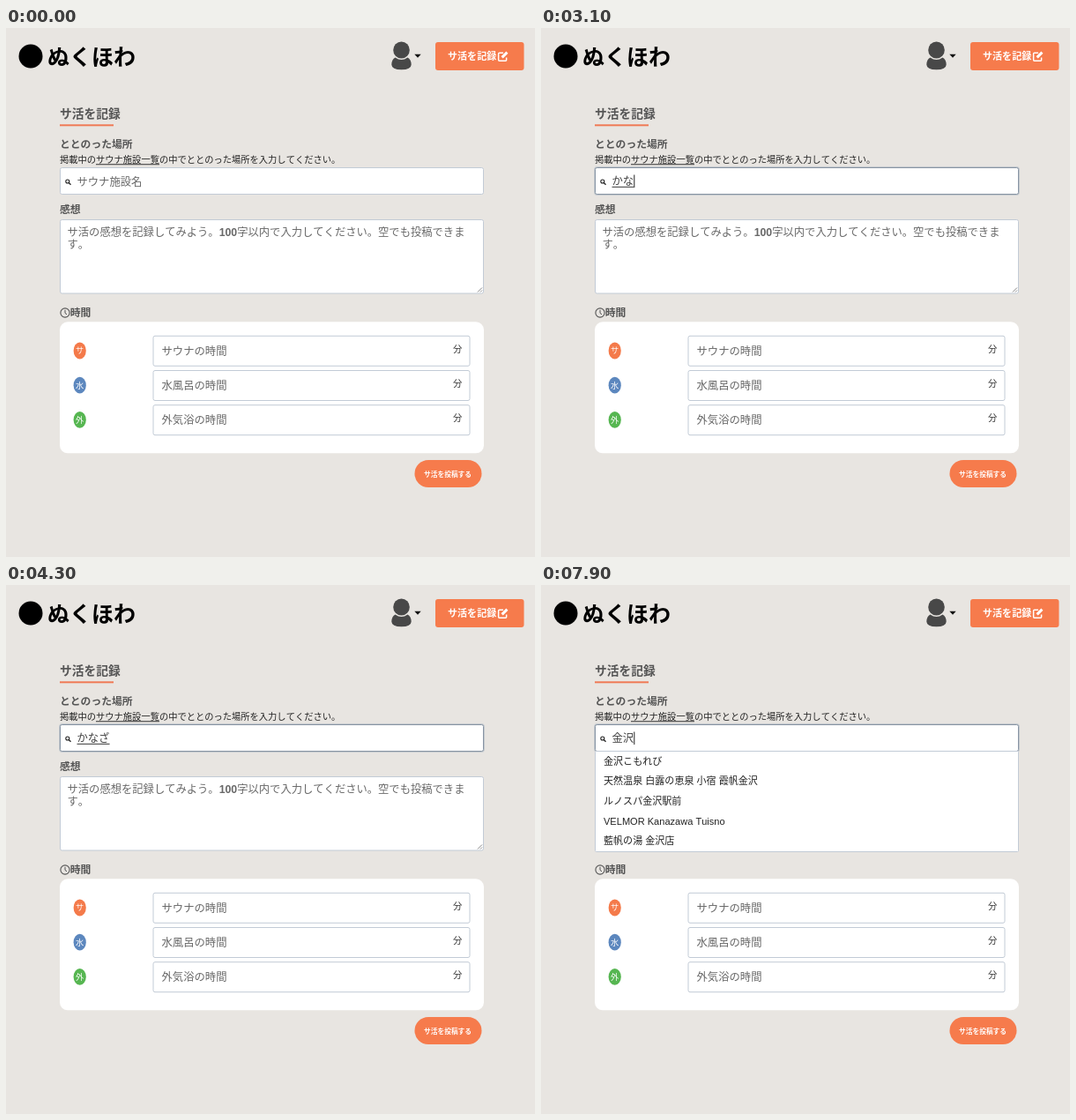
These frames come from a looping animation (600 by 600 pixels, 8 s). An HTML page:

```html
<!DOCTYPE html>
<html lang="ja">
<head>
<meta charset="utf-8">
<title>サ活を記録</title>
<style>
html, body { margin: 0; width: 100%; height: 100%; overflow: hidden; background: #e8e5e1; }
svg { display: block; width: 100vw; height: 100vh; }
text { font-family: "Liberation Sans", "Noto Sans CJK JP", "Noto Sans CJK", sans-serif; white-space: pre; font-kerning: none; }
</style>
</head>
<body>
<svg id="stage" viewBox="0 0 600 600" xmlns="http://www.w3.org/2000/svg"></svg>
<script>
const ORANGE = '#f67b4c', LINE = '#c2cbd6', HINT = '#686868', HEAD = '#555';
const CHAR = 12.35, TEXT_X = 80.4;

// Text placed by its left edge and vertical middle.
const label = (x, mid, size, fill, str, extra = '') =>
  `<text x="${x}" y="${mid + size * 0.38}" font-size="${size}" fill="${fill}" ${extra}>${str}</text>`;
const bold = 'font-weight="700"';
const box = (x, y, w, h, r, fill, extra = '') =>
  `<rect x="${x}" y="${y}" width="${w}" height="${h}" rx="${r}" fill="${fill}" ${extra}/>`;
const field = (x, y, w, h) => box(x, y, w, h, 2, '#fff', `stroke="${LINE}"`);

const header = `
  <circle cx="28" cy="32" r="13.5" fill="#000"/>
  ${label(47, 32, 25, '#000', 'ぬくほわ', bold)}
  <g fill="#484848">
    <ellipse cx="448.5" cy="25" rx="9.3" ry="9.6"/>
    <path d="M437.3 41.5Q437.5 35.5 441.5 33.5Q448.5 38.6 455.5 33.5Q459.5 35.5 459.7 41.5Q459.5 47.3 448.5 47.3Q437.5 47.3 437.3 41.5Z"/>
  </g>
  <path d="M463.3 29.7h7.4l-3.7 4z" fill="#111"/>
  ${box(487, 16, 100.5, 32, 3, ORANGE)}
  ${label(501, 32, 11.05, '#fff', 'サ活を記録', bold)}
  <g fill="none" stroke="#fff" stroke-width="1.5">
    <path d="M564 28.3h-4.4q-1 0-1 1v7q0 1 1 1h7q1 0 1-1v-2.8"/>
    <path d="M562.6 33.4l5.8-5.8" stroke-width="3"/>
  </g>`;

const form = `
  ${label(61, 97, 13.75, HEAD, 'サ活を記録', bold)}
  ${box(61, 109.3, 61, 2, 0, '#ef7a56')}
  ${label(61, 132, 11.8, HEAD, 'ととのった場所', bold)}
  ${label(61, 149.5, 10.28, '#222', '掲載中のサウナ施設一覧の中でととのった場所を入力してください。')}
  ${box(102, 154.3, 72, 0.9, 0, '#222')}
  ${label(61, 206, 11.8, HEAD, '感想', bold)}
  ${field(61.5, 217.5, 480, 83.5)}
  ${label(69.5, 231, 12.3, HINT, `サ活の感想を記録してみよう。<tspan ${bold}>100</tspan>字以内で入力してください。空でも投稿できま`)}
  ${label(69.5, 245.8, 12.3, HINT, 'す。')}
  <path d="M535 299.5l5-5M538 299.5l2-2" stroke="#666" stroke-width=".8"/>
  <circle cx="67" cy="323" r="5.1" fill="none" stroke="#555" stroke-width="1.1"/>
  <path d="M67 319.8v3.5l2 1.6" fill="none" stroke="#555"/>
  ${label(72.7, 323, 11.8, HEAD, '時間', bold)}
  ${box(61, 333.3, 481, 149, 9, '#fff')}
  ${[['サ', 'サウナの時間', '#f47a4a'], ['水', '水風呂の時間', '#5c87be'], ['外', '外気浴の時間', '#56b651']]
    .map(([mark, hint, color], i) => {
      const y = 366 + i * 39.2;
      return `<ellipse cx="83.7" cy="${y}" rx="7.1" ry="9.4" fill="${color}"/>
        ${label(83.7, y, 9.2, '#fff', mark, 'text-anchor="middle" font-weight="500"')}
        ${field(167, y - 16.7, 359, 34)}
        ${label(176.5, y, 12.35, HINT, hint)}
        ${label(507, y - 2, 10.3, '#333', '分')}`;
    }).join('')}
  ${box(463.5, 490, 76, 31, 15.5, ORANGE)}
  ${label(474, 505.8, 7.72, '#fff', 'サ活を投稿する', bold)}`;

const search = `
  <rect id="glow" x="61.5" y="158.5" width="480" height="30" rx="2.5" fill="none" stroke="#8fa0b4" stroke-width="3" opacity=".4"/>
  <rect id="edge" x="61.5" y="158.5" width="480" height="30" rx="2" fill="#fff"/>
  <circle cx="69.8" cy="174" r="2" fill="none" stroke="#222" stroke-width="1.1"/>
  <path d="M71.3 175.5l2.2 2.3" stroke="#222" stroke-width="1.3"/>
  ${label(TEXT_X, 174, CHAR, HINT, 'サウナ施設名', 'id="hint"')}
  ${label(TEXT_X, 173.6, CHAR, '#444', '', 'id="typed"')}
  <rect id="under" x="80.5" y="179.8" height="1" fill="#333"/>
  <rect id="caret" y="166.5" width="1" height="14.5" fill="#222"/>
  <g id="menu">
    ${box(61.5, 188.5, 480, 114, 1, '#fff', `stroke="${LINE}"`)}
    <g id="items"></g>
  </g>
  <path id="beam" d="M-3-6q2.4 0 3 1.6q.6-1.6 3-1.6M0-4.6v9.2M-3 6q2.4 0 3-1.6q.6 1.6 3 1.6M-1.3 1h2.6" fill="none" stroke="#111" stroke-width="1.1"/>`;

document.getElementById('stage').innerHTML = box(0, 0, 600, 600, 0, '#e8e5e1') + header + form + search;

const el = Object.fromEntries(['glow', 'edge', 'hint', 'typed', 'under', 'caret', 'menu', 'items', 'beam']
  .map(id => [id, document.getElementById(id)]));

const town = ['金沢こもれび', '天然温泉 白露の恵泉 小宿 霞帆金沢', 'ルノスパ金沢駅前'];
const menus = {
  first: ['サウナ&amp;カプセルホテル 星灯', ...town.slice(0, 2), `サウナ&amp;ホテル <tspan ${bold}>か</tspan>やほの 池袋店`, town[2]],
  second: [...town, 'VELMOR Kanazawa Tuisno', '藍帆の湯 金沢店']
};

// Each step changes some of the state from its time on.
const steps = [
  [0, { text: '', caret: false, focus: false, menu: '', composing: true }],
  [2000, { focus: true, caret: true }],
  [2400, { caret: false }],
  [2700, { text: 'ｋ', caret: true }],
  [2800, { text: 'か' }],
  [3100, { text: 'かな' }],
  [3500, { menu: 'first' }],
  [3600, { text: 'かなｚ' }],
  [3700, { text: 'かなざ' }],
  [4100, { caret: false }],
  [4300, { menu: '' }],
  [4600, { caret: true }],
  [5100, { text: 'かなざｗ' }],
  [5200, { text: 'かなざわ' }],
  [5400, { menu: 'second' }],
  [5500, { text: 'かなざわあ' }],
  [5800, { menu: '' }],
  [6000, { caret: false }],
  [6400, { text: 'かなざわ', caret: true }],
  [6700, { text: '金沢', caret: false }],
  [6900, { menu: 'second' }],
  [7500, { composing: false, caret: true }]
];

const show = (node, on) => node.setAttribute('visibility', on ? 'visible' : 'hidden');
let listed = '';

function draw(t) {
  const s = Object.assign({}, ...steps.filter(([at]) => at <= t).map(([, change]) => change));
  const width = s.text.length * CHAR;

  show(el.glow, s.focus);
  el.edge.setAttribute('stroke', s.focus ? '#8794a3' : LINE);
  show(el.hint, !s.text);
  el.typed.textContent = s.text;
  show(el.under, s.text && s.composing);
  el.under.setAttribute('width', width);
  show(el.caret, s.caret);
  el.caret.setAttribute('x', 80.6 + width);

  show(el.menu, s.menu);
  if (s.menu && s.menu !== listed) {
    el.items.innerHTML = menus[s.menu].map((name, i) => label(71, 199.6 + i * 22.65, 11.05, '#222', name)).join('');
    listed = s.menu;
  }

  // The pointer glides up into the field and hides once typing begins.
  const p = Math.min(1, (Math.floor(t / 100) * 100 - 2000) / 200);
  show(el.beam, t >= 2000 && t < 2700);
  el.beam.setAttribute('transform', `translate(${294.8 + 7.9 * p} ${175.5 - 9.3 * p})`);
}

const start = performance.now();
function tick() {
  draw((performance.now() - start) % 8000);
  requestAnimationFrame(tick);
}
tick();
</script>
</body>
</html>
```
